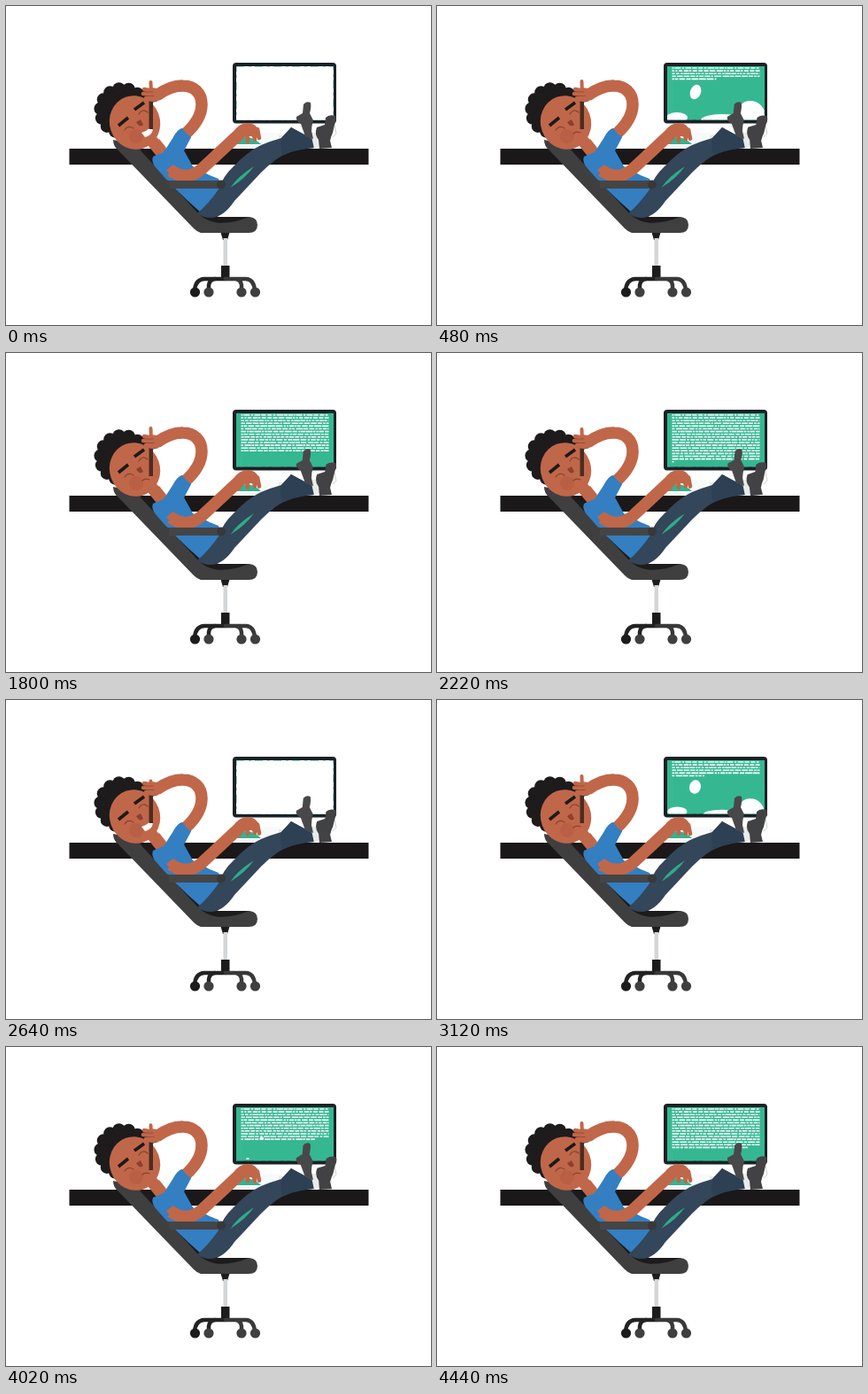
These frames come from a looping animation (480 px wide and 360 px high, 4.5 s). An HTML page:

```html
<!DOCTYPE html>
<html lang="en">
<head>
<meta charset="utf-8">
<title>Relaxing at the desk</title>
<style>
  html, body { margin: 0; width: 100%; height: 100%; overflow: hidden; background: #fff; }
  svg { display: block; width: 100vw; height: 100vh; }
  .line { fill: none; stroke-linecap: round; stroke-linejoin: round; }
  .flat { stroke-linecap: butt; }
  .skin { fill: #c0674a; }
  .limb { stroke: #c0674a; stroke-width: 13.5; }
  .dark { fill: #1d1b1c; }
  .grey { fill: #3f3f40; }
  .crease { stroke: #8a432e; stroke-width: 1.2; }
</style>
</head>
<body>
<svg viewBox="0 0 480 360">
  <defs>
    <clipPath id="glass"><rect x="260" y="68" width="110" height="60.5"/></clipPath>
  </defs>

  <!-- desk and computer -->
  <rect x="71.5" y="161" width="338" height="18" fill="#1b1819"/>
  <path d="M290 143H310L314 157H286Z" fill="#f8faf9"/>
  <path d="M308 146L350 143L356 158H309Z" fill="#e3e8e6"/>
  <path d="M371 134L373 144L369 148" class="line" stroke="#c9d5d0"/>
  <rect x="240" y="157" width="70" height="4" fill="#f3f5f4"/>
  <path d="M257 156Q271 140 288 156Z" fill="#35b28f"/>
  <rect x="256" y="64" width="117" height="68.5" rx="4" fill="#1b2126"/>
  <g clip-path="url(#glass)">
    <rect x="260" y="68" width="110" height="61" fill="#35b891"/>
    <g id="blobs" fill="#fff">
      <ellipse/><ellipse/><ellipse/><ellipse/>
    </g>
    <g id="rows" class="line flat" stroke="#f4fffb" stroke-width="1.6"></g>
    <rect x="260" y="68" width="110" height="61" fill="none" stroke="#35b891" stroke-dasharray="9 5 3 4"/>
  </g>

  <!-- chair -->
  <path class="dark" d="M242 254H253L250 264H245Z"/>
  <rect x="245.5" y="262" width="4.5" height="33" fill="#d3d6d6"/>
  <rect class="dark" x="243" y="293" width="9.5" height="14"/>
  <g class="line" stroke="#232324" stroke-width="4.5">
    <path d="M213 321Q214 308.500 224 308H248"/>
    <path d="M229 321V315Q230 308.500 236 308"/>
    <path stroke="#39393a" d="M248 308H271Q280 308.500 281 321M266 321V315Q265 308.500 259 308"/>
  </g>
  <circle class="dark" cx="213.5" cy="323" r="5.6"/>
  <circle class="grey" cx="229" cy="323" r="5.6"/>
  <circle class="grey" cx="266" cy="323" r="5.6"/>
  <circle class="grey" cx="281.500" cy="323" r="5.6"/>
  <path class="grey" d="M121 151L135 154Q145 161 152 161L221 233Q228 240 246 240Q262 240 270 238H275Q284 239 284 247Q284 256 274 256H220Q216 255 212 251L126 162Q121 158 121 151Z"/>
  <path class="dark" d="M150 161L172 170L224 230L240 238H274Q256 246 238 244.500Q226 243 217 234Z"/>

  <!-- hair and head -->
  <g class="dark" id="hair">
    <ellipse cx="131" cy="118" rx="25" ry="25"/>
    <path d="M147 95L167 94L172 107L150 113Z"/>
  </g>
  <path class="line limb" d="M160 146L176 166"/>
  <ellipse class="skin" cx="145.500" cy="131.500" rx="28.500" ry="30.500" transform="rotate(-20 145.500 131.500)"/>
  <circle cx="147" cy="147" r="8" fill="#b95f45"/>
  <g class="line flat" stroke="#1d1a1a" stroke-width="3.6">
    <path d="M127 135L138 126M145 117L156 109"/>
  </g>
  <g class="line crease">
    <path d="M134 140Q138 134 144 138M150 122Q154 115 160 120"/>
  </g>
  <path d="M147 131L152 128L155 134Q151 138 147 131Z" fill="#8b412e"/>
  <path id="grin" d="M153 143Q161 140 165 135Q168 145 157 148Z" fill="#fff"/>
  <path id="calm" class="line crease" d="M154 144Q157 141 162 143"/>

  <!-- body -->
  <path d="M166 170Q172 167 178 165L189 148Q194 139 199 138Q203 144 209 148L201 163L211 181L230 191L240 195L246 207L220 233Q190 207 168 181Q164 175 166 170Z" fill="#337fc2"/>
  <path class="skin" d="M164 158L173 150L181 160Q177 167 169 167Z"/>
  <path d="M216 234Q228 224 240 207Q245 192 257 181Q273 164 288 157Q300 152 311 149L322 137L346 150L348 160Q320 162 304 174Q296 180 288 188L258 220Q246 238 232 239Q222 239 216 234Z" fill="#33465a"/>
  <path d="M322 137L346 150L348 160Q328 161 312 168Q309 157 311 149Z" fill="#2d4054"/>
  <path d="M253.500 205Q262 192 280 181Q271 194 253.500 205Z" fill="#2fab8b"/>

  <!-- arms -->
  <path class="line limb flat" d="M202 145Q221 128 221 111C221 98 212 90 200 90Q186 89.500 170 101"/>
  <path d="M189 148Q194 139 199 138Q203 144 209 148L201 163L190 165Z" fill="#337fc2"/>
  <path class="line limb flat" d="M186 186Q205 198 221 184L265 143"/>
  <path class="skin" d="M181 185L189 179L200 186L190 196Z"/>
  <path class="skin" d="M257 142Q263 132 273 132Q282 132 286 141L284 149Q270 143 262 154Z"/>
  <g id="typing" class="line" stroke="#c0674a" stroke-width="4.6">
    <path d="M265 143L263 152"/><path d="M272 141L273 152"/>
    <path d="M279 140L281 151"/><path d="M284 140L286 150"/>
  </g>
  <path class="line flat" d="M180 201.500H243" stroke="#454546" stroke-width="9"/>
  <path class="grey" d="M168 195L184 197V206L176 205Z"/>
  <circle cx="243" cy="201.500" r="5" fill="#383839"/>

  <!-- phone hand -->
  <rect x="161.500" y="105" width="4.500" height="34" fill="#4b2c20"/>
  <path class="skin" d="M158 94Q166 90 177 95L178 103Q171 110 160 107Z"/>
  <path id="index" class="line" stroke="#c0674a" stroke-width="4"/>
  <g class="line" stroke="#c0674a" stroke-width="4.500">
    <path d="M156 94L167 96M155 99H167M158 104L168 103"/>
  </g>
  <path class="line crease" d="M157 97H166M157 101.500H167" style="stroke-width:.7"/>

  <!-- shoes -->
  <path d="M344 142L354 147V158L348 161Z" fill="#e8ebea"/>
  <path id="shoeA" d="M336 111Q339 107 344 109Q345 114 343 121L347 129Q345 135 345 141L347 150L338 147L333 133Q327 130 328 125L335 121Z" fill="#48484a"/>
  <path id="shoeB" d="M361 126Q365 122 372 124Q374 127 371 134L369 143Q367 147 366 152L368 160L354 161L353 151Q348 145 351 137L360 134Z" fill="#424244"/>
</svg>
<script>
  const LOOP = 4500, CYCLE = 2520, STEP = 60, ROWS = 19;
  const $ = id => document.getElementById(id);
  const lerp = (a, b, k) => a + (b - a) * k;
  const clamp = k => Math.max(0, Math.min(1, k));
  const NS = 'http://www.w3.org/2000/svg';

  function set(el, attrs) {
    for (const key in attrs) el.setAttribute(key, attrs[key]);
  }
  function add(parent, tag, attrs) {
    const el = document.createElementNS(NS, tag);
    set(el, attrs);
    parent.append(el);
    return el;
  }

  // Curls follow an arc around the back of the head.
  for (let i = 0; i < 9; i++) {
    const a = (110 + i * 25) * Math.PI / 180;
    add($('hair'), 'circle', {
      cx: 132 + 25.5 * Math.cos(a), cy: 118 + 25 * Math.sin(a), r: 7.2
    });
  }

  let seed = 17;
  const rand = () => (seed = seed * 16807 % 2147483647) / 2147483647;
  const rows = Array.from({ length: ROWS }, (_, i) => {
    const dashes = Array.from({ length: 20 }, (_, j) =>
      (j % 2 ? 0.6 + rand() : 2 + rand() * 6).toFixed(1));
    return add($('rows'), 'path', { 'stroke-dasharray': dashes.join(' '), 'data-y': 70 + i * 3.1 });
  });

  // Each white patch: x, y, rx, ry, first at 480 ms and then at 1140 ms.
  const patches = [
    [292, 97, 6, 8.5, 289, 103, 8, 4.8],
    [271, 126, 12, 6, 273, 126, 7, 3.5],
    [322, 129, 24, 7, 322, 131, 10, 0],
    [354, 125, 17, 18, 354, 131, 8, 0]
  ];

  function drawScreen(t) {
    const shown = 1.05 + t / 139;
    rows.forEach((row, i) => {
      row.setAttribute('d', `M265.5 ${row.dataset.y}h${99 * clamp(shown - i)}`);
    });
    const k = clamp((t - 480) / 660);
    const fade = 1 - clamp((t - 1140) / 500);
    const grow = 1 + 14 * clamp((480 - t) / 270) ** 2;
    [...$('blobs').children].forEach((el, i) => {
      const [x, y, rx, ry, x2, y2, rx2, ry2] = patches[i];
      const cx = lerp(x, x2, k), cy = lerp(y, y2, k);
      set(el, {
        cx, cy,
        rx: lerp(rx, rx2, k) * grow * fade,
        ry: lerp(ry, ry2, k) * grow * fade,
        transform: i ? '' : `rotate(${20 * (1 - k)} ${cx} ${cy})`
      });
    });
  }

  function drawPose(t) {
    const beat = t % 630;
    const dip = beat > 30 && beat < 270 ? Math.sin((beat - 30) / 240 * Math.PI) : 0;
    const lift = Math.exp(-(((beat - 510) / 35) ** 2));
    set($('index'), { d: `M164 99L163.5 ${86 + 6 * dip - 2 * lift}` });
    const smiling = t < 300 || t > 2400;
    $('grin').style.display = smiling ? '' : 'none';
    $('calm').style.display = smiling ? 'none' : '';
    [...$('typing').children].forEach((finger, i) => {
      const y = Math.sin(t / 420 * 2 * Math.PI + i * 1.7);
      set(finger, { transform: `translate(0 ${y})` });
    });
    const sway = Math.sin(t / 1260 * 2 * Math.PI);
    set($('shoeA'), { transform: `rotate(${-0.7 * sway} 342 150)` });
    set($('shoeB'), { transform: `rotate(${1.2 * sway} 360 160)` });
  }

  function draw() {
    const now = performance.now() % LOOP;
    const t = Math.floor(now / STEP) * STEP % CYCLE;
    drawScreen(t);
    drawPose(t);
    requestAnimationFrame(draw);
  }
  draw();
</script>
</body>
</html>
```
